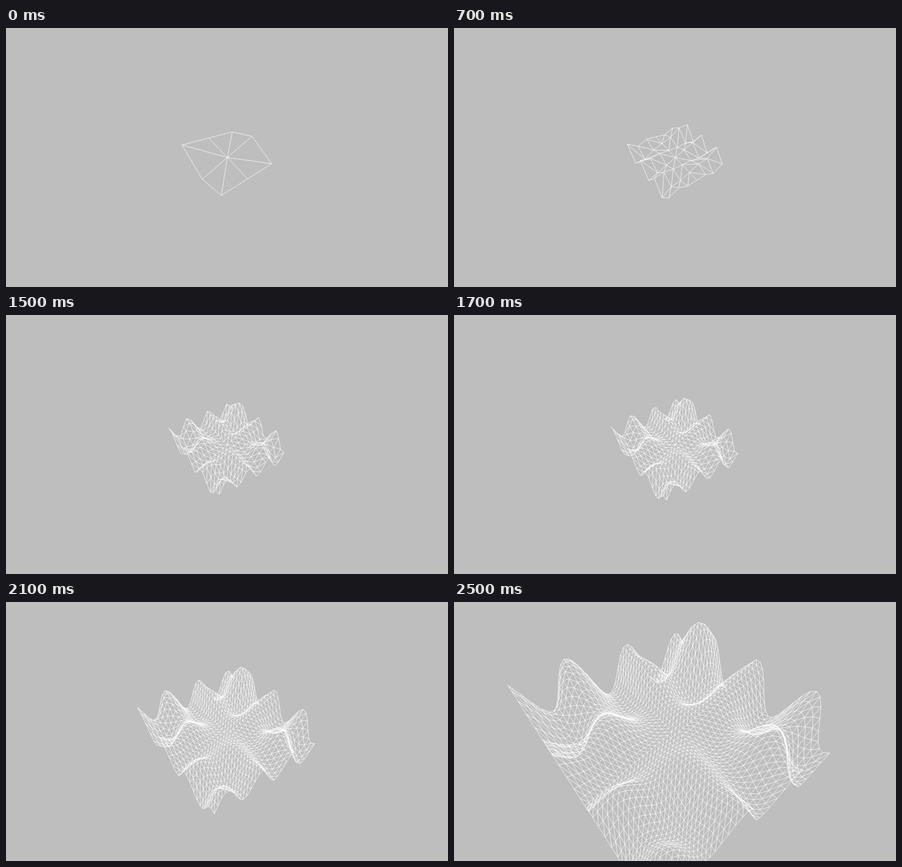
Animation, 641 px wide and 376 px high, one loop 2.6 s. Source, as an HTML page:

```html
<!DOCTYPE html>
<html lang="en">
<head>
<meta charset="utf-8">
<title>Refining surface</title>
<style>
  html, body { margin: 0; width: 100%; height: 100%; overflow: hidden; background: #bfbebf; }
  svg { display: block; width: 100vw; height: 100vh; }
  path { fill: none; stroke: #fff; stroke-width: .75; stroke-opacity: .85; }
</style>
</head>
<body>
<svg viewBox="0 0 641 376"><path id="mesh"/></svg>
<script>
const mesh = document.getElementById('mesh');
const LOOP = 2600, STEP = 100;

// Cells per side at every step
const CELLS = [2, 3, 3, 4, 4, 5, 5, 6, 7, 8, 9, 11, 12, 13, 15, 16, 18, 20, 22, 25, 28, 31, 34, 37, 40, 43];

const RANGE = 10, FOCAL = 454, CX = 321, CY = 188, Z_SCALE = .307;
const AZIMUTH = 52.1 * Math.PI / 180, ELEVATION = 55.1 * Math.PI / 180;
const sinA = Math.sin(AZIMUTH), cosA = Math.cos(AZIMUTH);
const sinE = Math.sin(ELEVATION), cosE = Math.cos(ELEVATION);

const height = (x, y) => y * Math.sin(x) - x * Math.cos(y);

// The camera moves in as the grid gets finer
const distance = n => 9.93 - .137 * (n - 2) - .045 * Math.max(0, n - 11);

function project(u, v, dist) {
  const z = Z_SCALE * height(u * RANGE, v * RANGE) / RANGE;
  const side = v * cosA - u * sinA;
  const front = u * cosA + v * sinA;
  const k = FOCAL / (dist - front * cosE - z * sinE);
  return { x: CX + side * k, y: CY + (front * sinE - z * cosE) * k };
}

const facing = ([a, b, c]) => (b.x - a.x) * (c.y - a.y) < (b.y - a.y) * (c.x - a.x);

function surface(n) {
  const dist = distance(n);
  const at = i => 2 * i / n - 1;
  const pts = [];
  for (let i = 0; i <= n; i++) {
    for (let j = 0; j <= n; j++) {
      const p = project(at(i), at(j), dist);
      p.id = pts.length;
      p.text = p.x.toFixed(2) + ' ' + p.y.toFixed(2);
      pts.push(p);
    }
  }

  // Shared edges are kept once, triangles facing away are dropped
  const edges = new Set();
  const edge = (p, q) => edges.add(p.id < q.id ? `M${p.text}L${q.text}` : `M${q.text}L${p.text}`);
  const triangle = (...t) => {
    if (facing(t)) t.forEach((p, i) => edge(p, t[(i + 1) % 3]));
  };

  for (let i = 0; i < n; i++) {
    for (let j = 0; j < n; j++) {
      const k = i * (n + 1) + j;
      const a = pts[k], b = pts[k + n + 1], c = pts[k + n + 2], d = pts[k + 1];
      // Diagonals point towards the middle
      if ((2 * i + 1 - n) * (2 * j + 1 - n) >= 0) {
        triangle(a, b, c);
        triangle(a, c, d);
      } else {
        triangle(a, b, d);
        triangle(b, c, d);
      }
    }
  }
  return [...edges].join('');
}

let shown = 0;
function draw(now) {
  const n = CELLS[Math.floor(now % LOOP / STEP)];
  if (n !== shown) mesh.setAttribute('d', surface(shown = n));
}

function tick() {
  draw(performance.now());
  requestAnimationFrame(tick);
}
tick();
</script>
</body>
</html>
```
